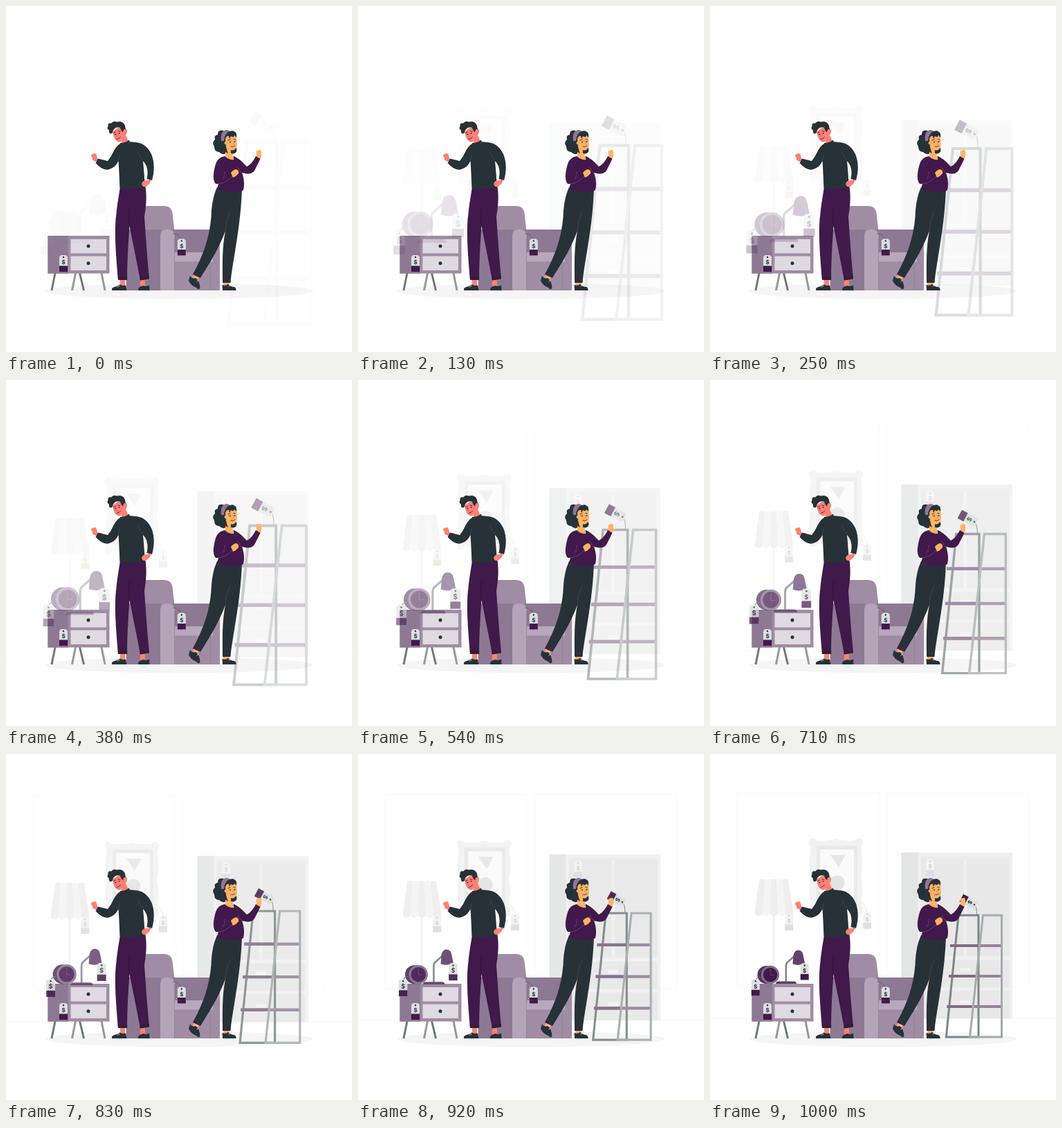
An HTML page that plays this animation: 500x500 px, repeating every 1.04 s.

```html
<!DOCTYPE html>
<html lang="en">
<head>
<meta charset="utf-8">
<title>Furniture sale</title>
<style>
  html, body { margin: 0; width: 100%; height: 100%; overflow: hidden; background: #fff; }
  svg { display: block; width: 100vw; height: 100vh; }
  text { font: bold 8px Inter, Roboto, sans-serif; text-anchor: middle; }
  .line { fill: none; stroke-linecap: round; stroke-linejoin: round; }
  .rail { fill: none; stroke-width: 3; }
</style>
</head>
<body>
<svg viewBox="0 0 500 500">
  <ellipse cx="250" cy="412" rx="193.500" ry="11.500" fill="#f5f5f5"/>

  <g id="room">
    <g fill="none" stroke="#f8f8f8" stroke-width=".8">
      <rect x="39.500" y="55.500" width="205" height="282" rx="2"/>
      <rect x="256.500" y="55.500" width="204" height="282" rx="2"/>
      <path d="M0 382.500H500" stroke="#f3f3f3"/>
    </g>

    <!-- cupboard -->
    <rect x="276.500" y="142.500" width="160.500" height="240" fill="#f0f0f0"/>
    <rect x="276.500" y="142.500" width="24" height="240" fill="#e3e4e4"/>
    <g fill="#e8e8e8">
      <path d="M305 152h61.500v140H305zM371 152h61.500v140H371z"/>
      <path d="M305 297.500h127.500v40H305zM305 342h127.500v40H305z"/>
    </g>
    <path d="M305 148h127.500v4H305z" fill="#ebebeb"/>
    <path d="M361 309h15v5.500h-15zM361 356h15v5.500h-15z" fill="#f2f2f2"/>

    <!-- picture -->
    <path fill="#f2f2f2" d="M146 122Q151 121 154 125Q168 127 182 123Q196 127 210 125Q213 121 218 122Q223 125 221 130Q218 133 219 142Q222 160 218 177Q222 194 219 212Q218 219 221 223Q222 230 217 232Q212 232 209 229Q196 227 182 231Q168 227 155 229Q151 233 146 232Q141 228 144 223Q147 219 145 211Q142 194 146 177Q142 160 145 142Q147 134 143 130Q141 125 146 122Z"/>
    <path fill="#e9e9e9" d="M154 133h59v88h-59z"/>
    <path fill="#fafafa" d="M159 138h49v78h-49z"/>
    <path fill="#e6e6e6" d="M174 146h21.500l-9.500 18z"/>
    <circle cx="184" cy="186" r="10.500" fill="#e3e3e3"/>

    <!-- floor lamp -->
    <path d="M92 232V332" stroke="#f0f0f0" stroke-width="2.500"/>
    <g id="shade"></g>
    <path class="line" d="M111 230Q115 231 114 236M219 214Q228 222 227 234" stroke="#e6e6e6"/>
    <g id="roomTags"></g>
  </g>

  <!-- armchair -->
  <path fill="#a08ca4" d="M179 411V295Q179 289 186 289H229Q238.500 289 240.500 299L244 330V411Z"/>
  <path fill="#8e7994" d="M173.500 323H224V411H173.500Z"/>
  <path fill="#8e7994" d="M240 323H296V360H240Z"/>
  <path fill="#a08ca4" d="M242 368H308V411H242Z"/>
  <path fill="#b7a8bb" d="M243 356H298Q300 356 300 359V370H243Z"/>
  <path fill="#a08ca4" d="M289 356L294 329Q296 323 302 323H305Q309 323 309 328V411H295V370H299V356Z"/>
  <path fill="none" stroke="#8e7994" stroke-width=".7" d="M243 370H295V411"/>
  <path fill="#b3a4b8" d="M223 411V333Q223 323 233 323Q244 323 244 333V411Z"/>
  <path fill="none" stroke="#96819b" stroke-width=".8" d="M243.500 411V333"/>
  <path class="line" stroke="#5d6669" d="M242 329Q252 330 254 340"/>

  <!-- drawers -->
  <g fill="none" stroke-width="3">
    <path stroke="#6e787b" d="M71 386L66 411M106.500 386L112.500 411"/>
    <path stroke="#929a9c" d="M100.500 386L95.500 411M138 386L143 411"/>
  </g>
  <path fill="#a08ca4" d="M60.500 332H149.500V386.500H60.500Z"/>
  <path fill="#8e7994" d="M60.500 332H90V386.500H60.500Z"/>
  <path fill="#dfd9e1" d="M93.500 337H145V357.500H93.500ZM93.500 361.500H145V382H93.500Z"/>
  <g fill="#263238"><circle cx="119" cy="347" r="2.500"/><circle cx="119" cy="371.800" r="2.500"/></g>
  <g id="saleTags"></g>

  <g id="clock">
    <circle cx="81.500" cy="319" r="13" fill="#52325c"/>
    <circle cx="87" cy="319" r="13.200" fill="#846d8c"/>
    <circle cx="87" cy="319" r="10.300" fill="#42194b"/>
    <path class="line" stroke="#6a4b75" stroke-width=".7" d="M87 311V319.500H92"/>
    <path class="line" stroke="#5d6669" d="M72 322Q66 323 66 328"/>
  </g>

  <g id="lamp">
    <path class="line" stroke="#7d8789" stroke-width="2.600" d="M109.800 329V306Q110 302 113 300L121 293"/>
    <path fill="#5d3e68" d="M95 332Q95 328.500 99 328.500H121Q125 328.500 125 332Z"/>
    <path fill="#61416d" d="M119.500 303.500L120.500 291Q122 283.500 127.500 283.500Q133.500 283.500 134.500 290L137 302Q129 307 119.500 303.500Z"/>
    <path class="line" stroke="#5d6669" d="M133 302Q137 302 136.500 307"/>
  </g>

  <g id="rack">
    <path class="rail" stroke="#7d8688" d="M359 233H388V409H341.300Z"/>
    <path stroke="#95839b" stroke-width="4" d="M347 277H421M345 321H421M342.500 365H421"/>
    <path stroke="#80698a" stroke-width="4" d="M347 277H387M345 321H384M342.500 365H380"/>
    <path class="rail" stroke="#a5abac" d="M394.500 233H421.500V409H375.500Z"/>
    <path class="line" stroke="#7d8688" d="M382 217Q386 222 385.500 232"/>
  </g>

  <!-- man -->
  <g>
    <path fill="#ff8076" d="M165 394h7v12h-7zM194 394h7v12h-7z"/>
    <path fill="#263238" d="M153 411Q152 407 157 406L165 402.500Q169 405 173 403.500L174.500 411ZM191 411Q190 407 195 405L199 404Q203 406 207 403.500L207.500 411Z"/>
    <path class="line" stroke="#fff" stroke-width=".8" d="M161 403l3 2M160 405l2 1"/>
    <path fill="#42194b" d="M165 261H201.500C204 278 202 292 200 305C202 335 204 362 207 394L194 396.500C190 375 184 345 178.500 318C176.500 345 175 370 175 396L162 396C159 360 156 325 159.500 300C161 284 163 275 165 261Z"/>
    <path fill="#2f2038" d="M161.700 391H175.200V396H162ZM193 392L206.600 390L207 394.500L194 396.500Z"/>
    <path class="line" stroke="#2c1034" stroke-width=".8" d="M178.500 318Q176 303 179 290"/>
    <path fill="#ff8076" d="M131 225Q124 224 125 220Q121 215 125 214Q130 211 131 216Q132 220 133 223Z"/>
    <path fill="#263238" d="M165 199C159 202 156 209 152 217L147 224L133 220.500L129.500 227C136 234 143 238 149 236C156 234 160 229 162.500 224C163.500 238 164 252 164.500 263Q183 266 201 262C200 250 199.500 238 198 224C204 230 206 238 203.500 250L211 252C215 238 214.500 226 210.500 215C206 205 199 198 188 197L177 196Z"/>
    <path class="line" stroke="#425057" stroke-width=".7" d="M198 224Q192 217 191 211M162.500 224Q163 217 165 214"/>
    <path fill="#ff8076" d="M209 250.500Q206 252 200 252.500Q195 255 196.500 259Q199 263 204 260Q208 257 210 251.500Z"/>
    <g transform="translate(1 .5)">
      <path fill="#ff8076" d="M153 181C154 189 157 195 162 196Q165 196 166 194L166 199L176 196L172 186Q175 182 173.500 178Q171 175 168 179L164 173Z"/>
      <path fill="#263238" d="M164 197.500Q171 197.500 177 193L179 200Q172 204 165 203Z"/>
      <path fill="#263238" d="M150 184Q147 183 148 179Q144 177 146.500 173Q146 168 151 169Q154 165 159 167Q168 165 171 172.500L172 178Q169 176 168 182Q165 180 164 175Q156 174 153.500 180Q153 184 150 184Z"/>
      <path class="line" stroke="#263238" stroke-width=".9" d="M154.500 183l3-1.500M161 180.500l3 .4M159 192Q163 192 164.500 188.500"/>
      <g fill="#263238"><circle cx="157" cy="185" r=".9"/><circle cx="162.500" cy="183.500" r=".9"/></g>
      <path class="line" stroke="#d65c57" stroke-width=".8" d="M159 184L158 188.500L160 188.500"/>
    </g>
  </g>

  <!-- woman -->
  <g>
    <path fill="#ffb266" d="M272 386l8 4l-4 7l-6-4zM314 397h9v8h-9z"/>
    <path fill="#42194b" d="M272 384L283 389L281 393L270 388ZM313 396H324.500V400H313Z"/>
    <path fill="#263238" d="M266 390Q269 395 274 393Q280 397 280.500 408Q278 411 275 407Q267 404 264 397ZM313 411L312.500 403Q317 405 321 402Q325 406 330 406Q333 408 332.500 411Z"/>
    <path class="line" stroke="#fff" stroke-width=".8" d="M276 398l2-2M322 405l2-1.500"/>
    <path fill="#263238" d="M305 262C299 275 297 290 296.500 305C294 335 285 360 271 386L282 391C297 368 309 347 317 325C312 350 313 375 313 398L324.500 398C330 355 339 318 341 264Z"/>
    <path class="line" stroke="#425057" stroke-width=".7" d="M317 325Q318 308 324 297"/>
    <path fill="#263238" d="M316 181Q306 177 306 186Q300 187 302 193Q297 197 301 203Q301 211 308 211Q313 216 318 213Q325 216 332 212Q335 208 332 204L318 194Z"/>
    <path fill="#ffb266" d="M316 190Q315 200 317 207L317 219Q323 224 328 218L327 209Q333 208 334 200L333 189L322 184Z"/>
    <path fill="#263238" d="M317 192Q319 187 322 188L323 192L325 188Q329 191 330 187L333 190Q334 184 331 182Q328 179 324 181Q318 179 314 185L314 206Q316 211 321 213Q317 204 317 192Z"/>
    <path fill="#263238" d="M325 213Q333 214 333 206Q329 210 325 208Z"/>
    <path fill="#8e7597" d="M311 195Q309 181 318 179Q322 179 323 181Q316 184 315 195Z"/>
    <path class="line" stroke="#263238" stroke-width=".9" d="M321 194l3-1M329 192.500l2.500.5M325 203Q329 204.500 331 201.500"/>
    <g fill="#263238"><circle cx="324" cy="196.500" r=".9"/><circle cx="330.500" cy="196" r=".9"/></g>
    <path class="line" stroke="#d98643" stroke-width=".8" d="M328 195.500L329.500 199.500L327.500 200"/>
    <circle cx="317.500" cy="198" r="2" fill="#ffb266"/>
    <path fill="#ffb266" d="M361 219L362.500 215Q360 209 364 208.500Q369 206 369 211Q370 217 367 222Z"/>
    <path fill="#42194b" d="M316 217C307 219 304 224 302 232C299 244 299 252 303 257L307 257L305 264C315 269 335 271 343 266C345 258 344 249 341 241C352 244 357 242 360 236L367.500 221L361 217C358 223 354 229 348 232C343 227 337 220 329 217Q323 224 316 217Z"/>
    <path fill="#ffb266" d="M317 217L328.500 217L329.500 222Q322 223 317 217Z"/>
    <path class="line" stroke="#6a4b75" stroke-width=".8" d="M316 239Q317 246 313 250M307 257Q317 257 327 246M341 241Q336 238 335 233"/>
    <path fill="#ffb266" d="M325 241Q329 236 333 236Q337 238 336 242Q333 246 328 248Z"/>
  </g>
</svg>
<script>
  const byId = id => document.getElementById(id);
  const dark = { paper: '#dcdfe0', base: '#42194b', ink: '#263238' };
  const pale = { paper: '#f3f3f3', base: '#dedede', ink: '#cfcfcf' };

  // Price tag centred on x, y
  const tag = (x, y, c, turn = 0) => `
    <g transform="translate(${x} ${y}) rotate(${turn})">
      <path fill="${c.paper}" d="M-6 12V-9.500L-3.500 -12H3.500L6 -9.500V12Z"/>
      <path fill="${c.base}" d="M-6 3.500H6V12H-6Z"/>
      <circle cy="-9" r="1.200" fill="${c.ink}"/>
      <text y="1.200" fill="${c.ink}">$</text>
    </g>`;
  const add = (id, markup) => byId(id).insertAdjacentHTML('beforeend', markup);

  add('roomTags', tag(114.2, 243, pale) + tag(227, 240.5, pale) + tag(318, 164, pale));
  add('saleTags', tag(83, 372, dark) + tag(253.8, 348.5, dark));
  add('clock', tag(65.8, 337.3, dark));
  add('lamp', tag(136.7, 314.5, dark));
  add('rack', tag(374, 213.5, dark, 118));

  // Lampshade pleats
  for (let i = 0; i < 5; i++) {
    const top = 71 + i * 8.4, low = 64.5 + i * 11.2;
    add('shade', `<path fill="${i % 2 ? '#f4f4f4' : '#eeeeee'}"
      d="M${top} 182q4.200 -3 8.400 0L${low + 11.2} 231q-5.600 7 -11.200 0Z"/>`);
  }

  const LOOP = 1040, STEPS = 24, STEP = 1000 / STEPS;
  const zooms = [['clock', 80, 327], ['lamp', 118.5, 308], ['rack', 381, 306.5]];

  function draw(t) {
    const step = Math.min(STEPS, Math.floor((t + 5) / STEP));
    const p = (step + 0.5) / (STEPS + 0.5);
    const room = byId('room');
    room.setAttribute('opacity', p);
    room.setAttribute('transform', `translate(0 ${30 * (1 - p)})`);
    const s = 1.5 - 0.5 * p;
    for (const [id, x, y] of zooms) {
      byId(id).setAttribute('opacity', p);
      byId(id).setAttribute('transform', `translate(${x} ${y}) scale(${s}) translate(${-x} ${-y})`);
    }
  }

  let start;
  function tick(now) {
    start ??= now;
    draw((now - start) % LOOP);
    requestAnimationFrame(tick);
  }
  draw(0);
  requestAnimationFrame(tick);
</script>
</body>
</html>
```
